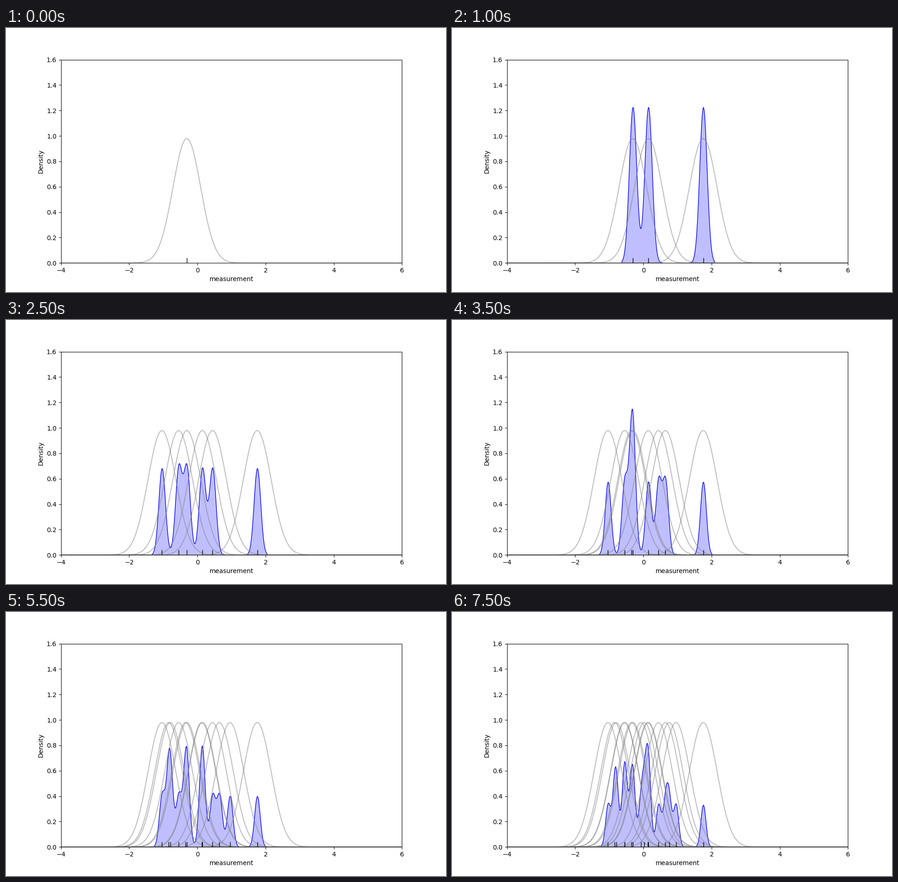
A matplotlib script that plays this animation: 966 px wide and 580 px high, repeating every 8 s.

```python
import numpy as np
import matplotlib.pyplot as plt
from matplotlib.animation import FuncAnimation

DPI = 100
STEP_MS = 500
KERNEL_BW = 0.407   # width of the single grey kernels
KDE_FACTOR = 0.1    # KDE bandwidth as a fraction of the sample deviation
RUG_HEIGHT = 0.025  # in axes units

samples = np.array([
    -0.31, 0.145, 1.754, -1.04, -0.55, 0.443, -0.345, 0.645,
    0.13, 0.955, -0.845, -0.795, -0.555, -0.073, 0.755, 0.028,
])


def gauss(x, mean, sd):
    return np.exp(-0.5 * ((x - mean) / sd) ** 2) / (sd * np.sqrt(2 * np.pi))


def kde_outline(points):
    """Closed outline of the density estimate, cut three bandwidths out."""
    bw = KDE_FACTOR * points.std(ddof=1)
    x = np.linspace(points.min() - 3 * bw, points.max() + 3 * bw, 200)
    y = gauss(x[:, None], points, bw).mean(axis=1)
    top = np.column_stack([x, y])
    return np.vstack([[x[0], 0], top, [x[-1], 0]])


fig, ax = plt.subplots(figsize=(9.66, 5.8), dpi=DPI)
ax.set(xlim=(-4, 6), ylim=(0, 1.6), xlabel="measurement", ylabel="Density")

area = ax.fill_between([0, 0], 0, [0, 0], facecolor=(0, 0, 1, 0.25),
                       edgecolor=(0, 0, 1, 1), linewidth=1)
support = np.linspace(-4, 6, 200)
kernels = [
    ax.plot(support, gauss(support, s, KERNEL_BW), color="gray", alpha=0.5, lw=1.5)[0]
    for s in samples
]
rugs = [
    ax.plot([s, s], [0, RUG_HEIGHT], color="black", lw=1,
            solid_capstyle="butt", transform=ax.get_xaxis_transform())[0]
    for s in samples
]


def update(frame):
    count = frame + 1
    for i, (kernel, rug) in enumerate(zip(kernels, rugs)):
        kernel.set_visible(i < count)
        rug.set_visible(i < count)
    area.set_visible(count > 1)
    if count > 1:
        area.set_verts([kde_outline(samples[:count])])
    return [area, *kernels, *rugs]


anim = FuncAnimation(fig, update, frames=len(samples), interval=STEP_MS,
                     repeat=True, repeat_delay=0, blit=False)
plt.show()
```
